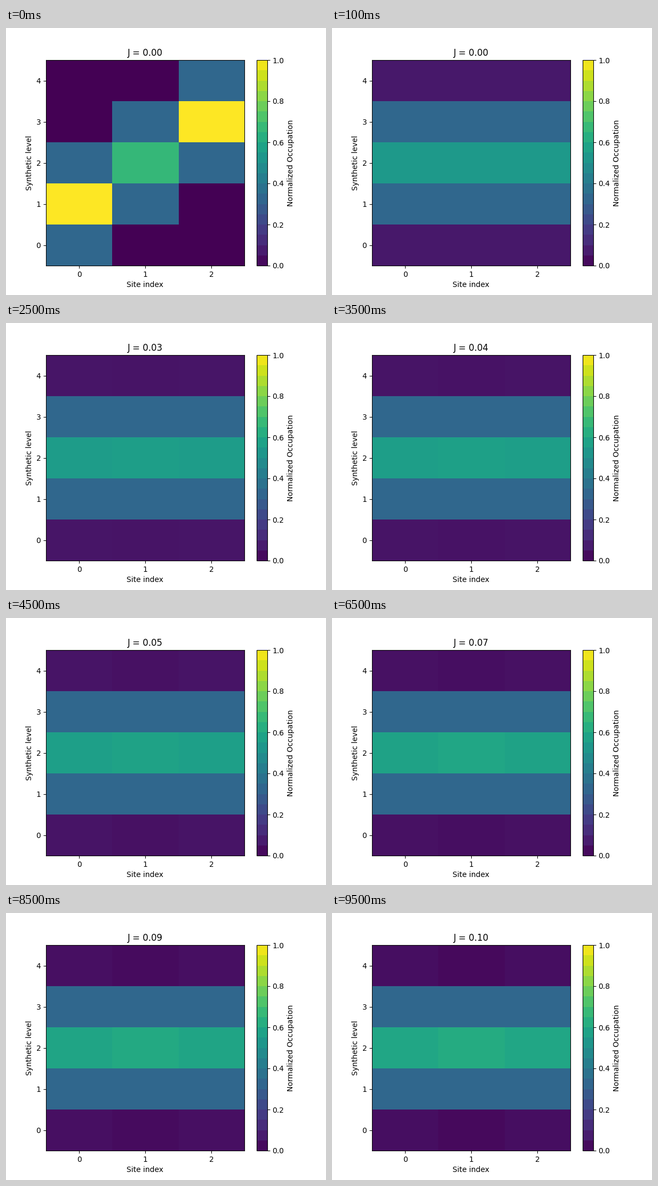
A matplotlib script that plays this animation: 600x500 px, repeating every 10 s.

```python
import numpy as np
import matplotlib.pyplot as plt
from matplotlib.animation import FuncAnimation
from matplotlib.cm import ScalarMappable
from matplotlib.colors import ListedColormap, Normalize

FRAMES = 100
J_MAX = 0.1
SITES, LEVELS, BANDS = 3, 5, 20
VIRIDIS = plt.get_cmap("viridis")


def start_state():
    """A diagonal band across the lattice, fading with distance from it."""
    level, site = np.mgrid[:LEVELS, :SITES]
    along = np.abs(site - 1)
    off = np.abs(level - site - 1)
    return np.clip(2 + along - off * (1 + along), 0, None) / 3


def relaxed_state(j):
    """Coupling draws the outer levels inward, most at the middle site."""
    site = np.arange(SITES)
    drop = 0.038 - 0.012 * np.abs(site - 1)
    outer = 0.063 - drop * j / J_MAX
    inner = np.full(SITES, 1 / 3)
    middle = 2 / 3 - 2 * outer
    return np.array([outer, inner, middle, inner, outer])


fig, ax = plt.subplots(figsize=(6, 5), dpi=100)
image = ax.imshow(start_state(), origin="lower", aspect="auto",
                  cmap=VIRIDIS, vmin=0, vmax=1, interpolation="nearest")
bands = ListedColormap(VIRIDIS((np.arange(BANDS) + 0.5) / BANDS))
fig.colorbar(ScalarMappable(Normalize(0, 1), bands), ax=ax,
             label="Normalized Occupation")
ax.set_xticks(range(SITES))
ax.set_yticks(range(LEVELS))
ax.set_xlabel("Site index")
ax.set_ylabel("Synthetic level")
title = ax.set_title("J = 0.00")


def update(i):
    j = J_MAX * i / (FRAMES - 1)
    image.set_data(relaxed_state(j) if i else start_state())
    title.set_text(f"J = {j:.2f}")
    return image, title


anim = FuncAnimation(fig, update, frames=FRAMES, interval=100,
                     repeat=True, repeat_delay=0, blit=False)
plt.show()
```
